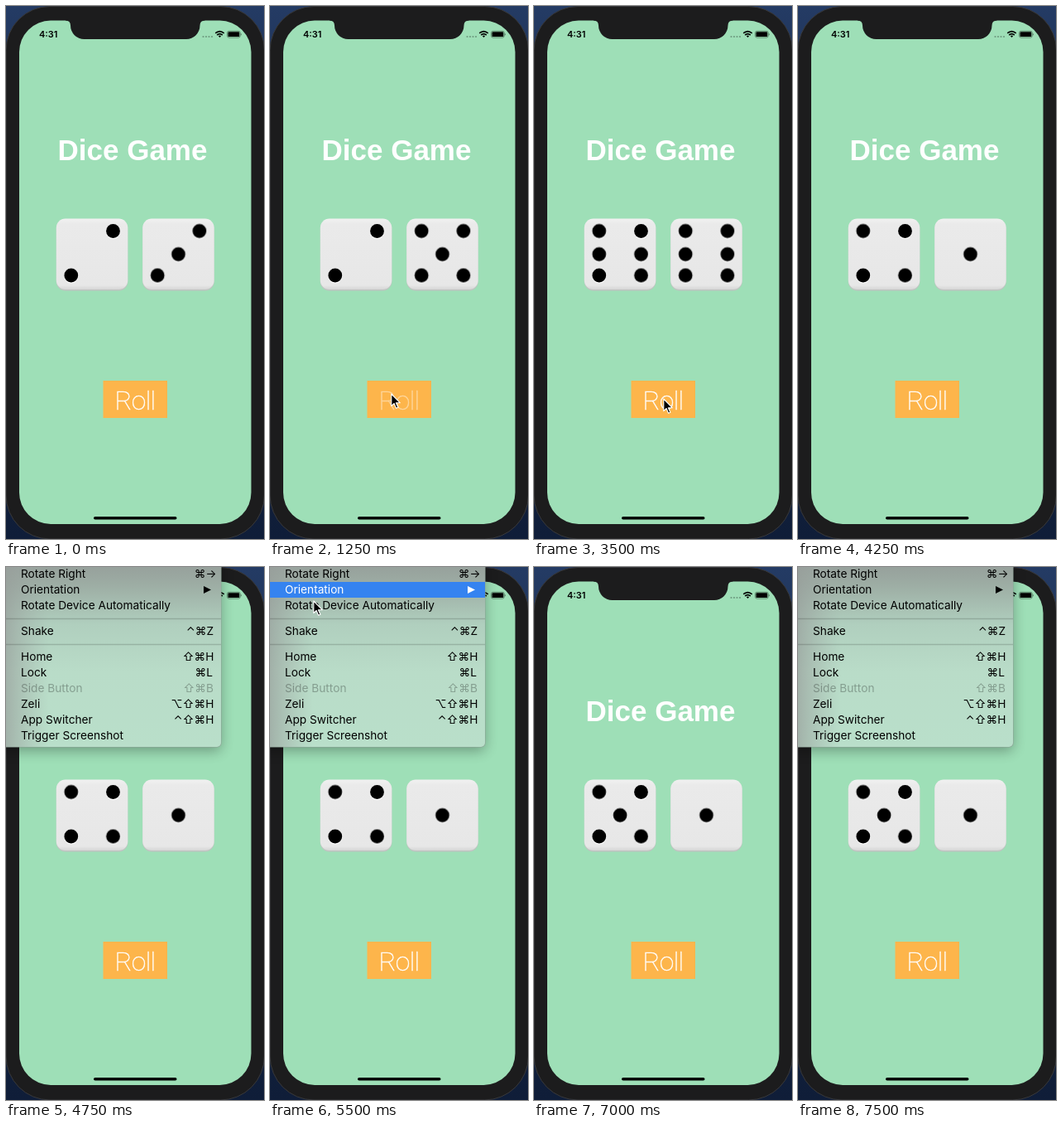
Write an HTML page that moves like this. It is 312x643 px and loops after 8 s.

```html
<!DOCTYPE html>
<html lang="en">
<head>
<meta charset="utf-8">
<title>Dice Game</title>
<style>
html, body { margin: 0; width: 100%; height: 100%; overflow: hidden; background: #14203a; }
svg { display: block; width: 312px; height: 643px; }
text { white-space: pre; }
.title { font: bold 35px "Liberation Sans", Arial, sans-serif; fill: #fff; }
.clock { font: 600 11px Inter, sans-serif; }
.label { font: 100 32px Roboto, sans-serif; letter-spacing: -.7px; fill: #fff; stroke: #fff; stroke-width: .45px; text-anchor: middle; }
.menu text { font: 13.7px Inter, "DejaVu Sans", sans-serif; }
.key { text-anchor: end; }
.off { opacity: .28; }

/* Everything switches in hard steps on one 8 s clock. */
.anim { animation: 8s step-end infinite; }
.cursor { animation-name: cursor; }
.label { animation-name: press; }
.menu { animation-name: menu; }
.hot1 { animation-name: hot1; }
.hot2 { animation-name: hot2; }
.left .mid { animation-name: leftMid; }
.left .fall { animation-name: leftFall; }
.left .eye { animation-name: leftEye; }
.right .mid { animation-name: rightMid; }
.right .fall { animation-name: rightFall; }
.right .rise { animation-name: rightRise; }
.right .eye { animation-name: rightEye; }

@keyframes cursor {
  0%, 53.125%, 87.5%, 100% { transform: translate(-60px, -60px); }
  6.25% { transform: translate(168px, 399px); }
  9.375% { transform: translate(136px, 459px); }
  12.5% { transform: translate(146px, 467px); }
  18.75% { transform: translate(149px, 472px); }
  28.125% { transform: translate(150px, 472px); }
  37.5% { transform: translate(154px, 473px); }
  40.625% { transform: translate(155px, 472px); }
  43.75% { transform: translate(156px, 473px); }
  50% { transform: translate(150px, 24px); }
  68.75% { transform: translate(52px, 40px); }
  71.875% { transform: translate(50px, 81px); }
  78.125% { transform: translate(49.5px, 79px); }
}
@keyframes press {
  0%, 18.75%, 28.125%, 34.375%, 43.75%, 53.125%, 100% { opacity: 1; }
  15.625%, 21.875%, 31.25%, 37.5%, 46.875% { opacity: .45; }
  25%, 40.625%, 50% { opacity: .75; }
}
@keyframes menu {
  0%, 81.25% { opacity: 0; }
  59.375%, 93.75%, 100% { opacity: 1; }
  78.125% { opacity: .96; }
}
@keyframes hot1 {
  0%, 71.875%, 100% { opacity: 0; }
  68.75% { opacity: 1; }
}
@keyframes hot2 {
  0%, 81.25%, 100% { opacity: 0; }
  71.875% { opacity: 1; }
}
@keyframes leftMid {
  0%, 46.875%, 100% { opacity: 0; }
  40.625% { opacity: 1; }
}
@keyframes leftFall {
  0% { opacity: 0; }
  40.625%, 100% { opacity: 1; }
}
@keyframes leftEye {
  0%, 40.625% { opacity: 0; }
  31.25%, 81.25%, 100% { opacity: 1; }
}
@keyframes rightMid {
  0%, 31.25%, 46.875%, 100% { opacity: 0; }
  25%, 40.625% { opacity: 1; }
}
@keyframes rightFall {
  0%, 31.25%, 46.875%, 100% { opacity: 0; }
  15.625%, 40.625% { opacity: 1; }
}
@keyframes rightRise {
  0% { opacity: 1; }
  46.875%, 100% { opacity: 0; }
}
@keyframes rightEye {
  0%, 46.875%, 100% { opacity: 1; }
  25% { opacity: 0; }
}
</style>
</head>
<body>
<svg viewBox="0 0 312 643">
  <defs>
    <linearGradient id="wall" x2="0" y2="1">
      <stop offset="0" stop-color="#243b64"/>
      <stop offset=".3" stop-color="#1a2c4e"/>
      <stop offset="1" stop-color="#0f1d38"/>
    </linearGradient>
    <linearGradient id="face" x2="0" y2="1">
      <stop offset="0" stop-color="#f1f1f1"/>
      <stop offset=".08" stop-color="#eaeaea"/>
      <stop offset=".94" stop-color="#e7e7e7"/>
      <stop offset="1" stop-color="#d6d6d6"/>
    </linearGradient>
    <linearGradient id="glass" x2="0" y2="1">
      <stop offset="0" stop-color="#949b98"/>
      <stop offset=".14" stop-color="#9dada4"/>
      <stop offset=".35" stop-color="#b0cfbe"/>
      <stop offset=".6" stop-color="#b9dcc8"/>
      <stop offset="1" stop-color="#b9dfca"/>
    </linearGradient>
    <linearGradient id="edge">
      <stop offset="0" stop-color="#989e9b" stop-opacity=".7"/>
      <stop offset=".2" stop-color="#a3b0a9" stop-opacity="0"/>
    </linearGradient>
    <filter id="soft" x="-20%" y="-20%" width="140%" height="140%">
      <feGaussianBlur stdDeviation="8"/>
    </filter>
    <g id="pip">
      <circle cy=".9" r="8.600" fill="#fff"/>
      <circle r="8.400"/>
    </g>
    <g id="block">
      <rect y="1" width="86.5" height="86" rx="11" fill="#bfc4c1"/>
      <rect width="86.5" height="85.5" rx="11" fill="url(#face)"/>
    </g>
  </defs>

  <rect width="312" height="643" fill="url(#wall)"/>
  <rect x="0" y=".5" width="312.5" height="642.5" rx="53" fill="#1c1c1d" stroke="#38393c"/>
  <rect x="16" y="17.5" width="280.5" height="607.5" rx="38" fill="#9edfb7"/>
  <path fill="#1c1c1d" d="M72 17V17.5Q78 17.5 78 23.5A16.5 16.5 0 0 0 94.5 40H218A16.5 16.5 0 0 0 234.5 23.5Q234.5 17.5 240.5 17.5V17Z"/>

  <text class="clock" x="40" y="38">4:31</text>
  <g fill="#6f9c80">
    <circle cx="238.5" cy="37" r="1.1"/><circle cx="242" cy="37" r="1.1"/>
    <circle cx="245.5" cy="37" r="1.1"/><circle cx="249" cy="37" r="1.1"/>
  </g>
  <g fill="none" stroke="#000" stroke-width="1.7">
    <path d="M253.3 32.9Q258.5 28.3 263.7 32.9M255.2 35Q258.5 32.3 261.8 35"/>
    <path d="M256.9 36.2Q258.5 35 260.1 36.2L258.5 38Z" fill="#000" stroke="none"/>
  </g>
  <rect x="267.5" y="30.3" width="15.8" height="7.8" rx="2.2" fill="none" stroke="#4d7059" stroke-width=".8"/>
  <rect x="268.5" y="31.3" width="13.8" height="5.8" rx="1.2"/>
  <path d="M284.2 32.7Q286 34.2 284.2 35.7Z" fill="#4d7059"/>

  <text class="title" x="62.5" y="185.5">Dice Game</text>

  <g class="left" transform="translate(60.800 256.500)">
    <use href="#block"/>
    <g><use href="#pip" x="68.7" y="15"/><use href="#pip" x="18" y="68.5"/></g>
    <g class="anim fall"><use href="#pip" x="18" y="15"/><use href="#pip" x="68.7" y="68.5"/></g>
    <g class="anim mid"><use href="#pip" x="18" y="43"/><use href="#pip" x="68.7" y="43"/></g>
    <use class="anim eye" href="#pip" x="43.3" y="43"/>
  </g>
  <g class="right" transform="translate(165.200 256.500)">
    <use href="#block"/>
    <g class="anim rise"><use href="#pip" x="68.7" y="15"/><use href="#pip" x="18" y="68.5"/></g>
    <g class="anim fall"><use href="#pip" x="18" y="15"/><use href="#pip" x="68.7" y="68.5"/></g>
    <g class="anim mid"><use href="#pip" x="18" y="43"/><use href="#pip" x="68.7" y="43"/></g>
    <use class="anim eye" href="#pip" x="43.3" y="43"/>
  </g>

  <rect x="117.5" y="452" width="77.5" height="45" fill="#fdb54b"/>
  <text class="anim label" x="156" y="486.5">Roll</text>
  <rect x="106" y="616" width="100.5" height="3.6" rx="1.8"/>

  <g class="anim menu">
    <rect x="-10" y="-8" width="270" height="230" rx="6" opacity=".3" filter="url(#soft)"/>
    <rect x="-10" y="-10" width="270.5" height="227.5" rx="5" fill="#8da397"/>
    <rect x="-10" y="-10" width="270" height="227" rx="5" fill="url(#glass)"/>
    <rect width="260" height="217" fill="url(#edge)"/>
    <path d="M0 62.5H260M0 93.5H260" stroke="#000" stroke-opacity=".16" stroke-width="1.5"/>
    <text x="18" y="13">Rotate Right</text><text class="key" x="254.5" y="13">⌘→</text>
    <g id="orient">
      <text x="18" y="32">Orientation</text>
      <path d="M239 23V32L248 27.5Z"/>
    </g>
    <text x="18" y="51">Rotate Device Automatically</text>
    <g id="shake">
      <text x="18" y="82">Shake</text><text class="key" x="251" y="82">⌃⌘Z</text>
    </g>
    <text x="18" y="113">Home</text><text class="key" x="251.5" y="113">⇧⌘H</text>
    <text x="18" y="132">Lock</text><text class="key" x="250" y="132">⌘L</text>
    <g class="off"><text x="18" y="151">Side Button</text><text class="key" x="251" y="151">⇧⌘B</text></g>
    <text x="18" y="170">Zeli</text><text class="key" x="251.5" y="170">⌥⇧⌘H</text>
    <text x="18" y="189">App Switcher</text><text class="key" x="251.5" y="189">⌃⇧⌘H</text>
    <text x="18" y="208">Trigger Screenshot</text>
    <g class="anim hot1" fill="#fff">
      <rect y="18" width="260" height="19" fill="#3583f0"/>
      <use href="#orient"/>
    </g>
    <g class="anim hot2" fill="#fff">
      <rect y="68" width="260" height="19" fill="#3583f0"/>
      <use href="#shake"/>
    </g>
  </g>

  <g class="anim cursor">
    <path d="M.8 1V15.6L4.1 12.5L6.6 18.2L8.9 17.2L6.4 11.7H11.2Z" stroke="#fff" stroke-width="1.1" stroke-linejoin="round"/>
  </g>
</svg>
</body>
</html>
```
